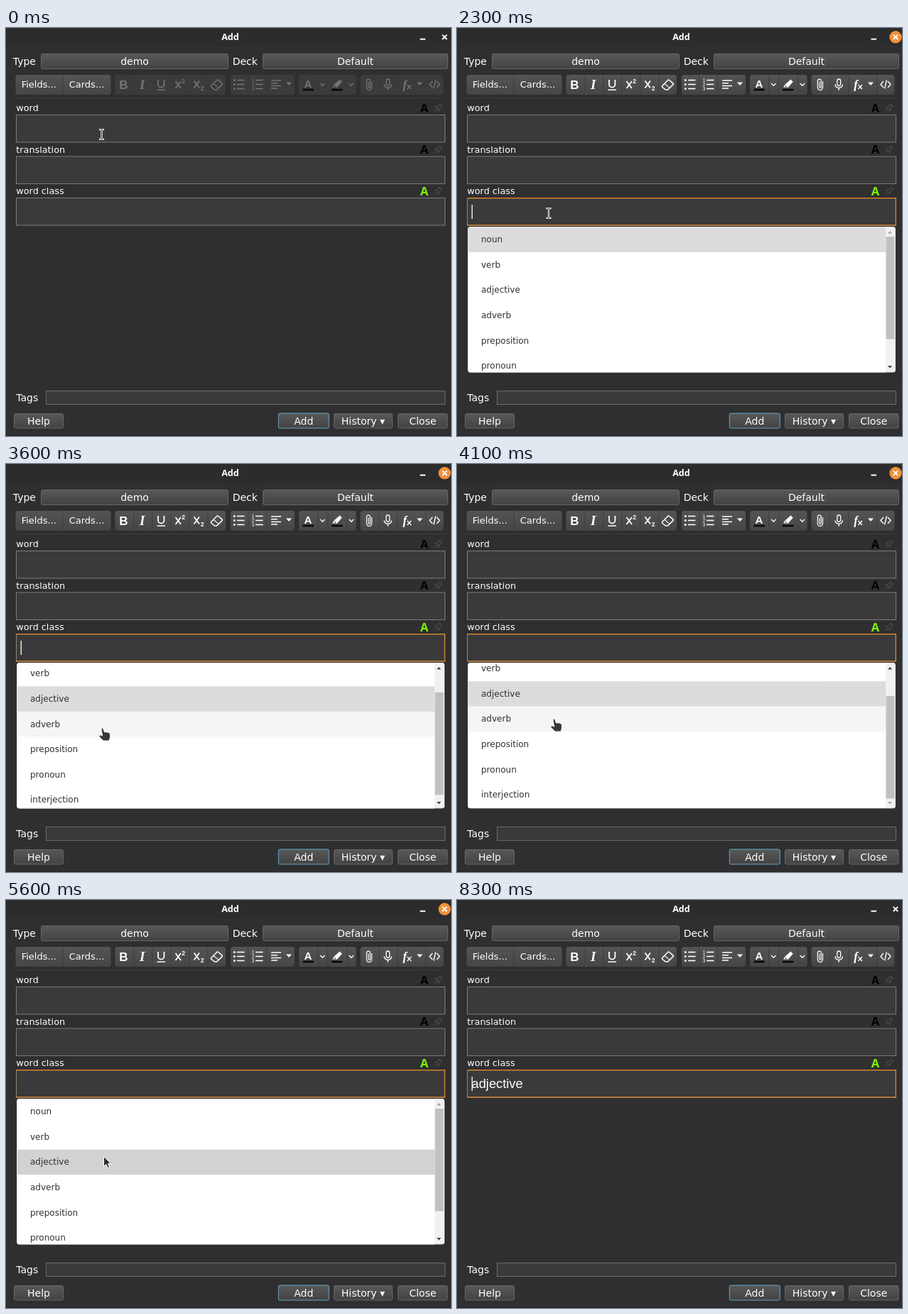
Write an HTML page that moves like this. It is 626x575 px and loops after 8400 ms.

```html
<!DOCTYPE html>
<html lang="en">
<head>
<meta charset="utf-8">
<title>Add</title>
<style>
html, body { margin: 0; width: 100%; height: 100%; overflow: hidden; background: #2f2f31; }
svg { display: block; width: 626px; height: 575px; }
text { font-family: "DejaVu Sans", sans-serif; white-space: pre; }
</style>
</head>
<body>
<svg id="stage" viewBox="0 0 626 575" xmlns="http://www.w3.org/2000/svg"></svg>
<script>
const LOOP = 8400, ROW = 35.6, TOP = 280.5, MAX_SCROLL = 45.5;
const WORDS = ["noun", "verb", "adjective", "adverb", "preposition", "pronoun", "interjection"];
const FIELDS = [["word", 122.5], ["translation", 181], ["word class", 239.5]];
const stage = document.getElementById("stage");

const rect = (x, y, w, h, fill, extra = "") =>
  `<rect x="${x}" y="${y}" width="${w}" height="${h}" fill="${fill}" ${extra}/>`;
const text = (x, y, s, size, fill = "#fff", extra = "") =>
  `<text x="${x}" y="${y}" font-size="${size}" fill="${fill}" ${extra}>${s}</text>`;
const path = (d, extra = "") => `<path d="${d}" ${extra}/>`;
const line = (d, w = 1.5, extra = "") =>
  path(d, `fill="none" stroke="currentColor" stroke-width="${w}" ${extra}`);
const MID = 'text-anchor="middle"';

const button = (x, y, w, h, label, border = "#666") =>
  rect(x, y, w, h, "url(#btn)", `rx="2" stroke="${border}"`) +
  text(x + w / 2, y + 15.5, label, 14, "#fff", MID);

function field([label, y], i) {
  const mark = i === 2 ? "#7cf800" : "#000";
  return text(14.3, y - 5.4, label, 12.8) +
    text(588.5, y - 3.6, "A", 16.5, mark, `${MID} font-weight="bold" style="font-family:'Noto Sans',sans-serif"`) +
    `<g transform="translate(607.5 ${y - 9.5}) rotate(45)" color="#4b4b4d">` +
    line("M-3-6H3M-2-6V-1L-4 1.5H4L2-1V-6M0 1.5V7", 1.2) + "</g>" +
    rect(14.5, y, 603, 38.5, "#3a3a3a", 'stroke="#7c7c7c"');
}

// Toolbar: button groups with their inner dividers
const GROUPS = [
  [153.5, 309, [179.5, 205.5, 231.5, 257.5, 283.5]],
  [316, 406, [340.5, 366.5]],
  [412, 492.5, [438.5, 452.5, 479.5]],
  [498.5, 615.5, [524.5, 550.5, 590.5]]
];
const group = ([a, b, cuts], fill) =>
  rect(a, 66, b - a, 28, fill, 'rx="4"') +
  cuts.map(x => rect(x, 66, 0.7, 28, "#39393a")).join("");
const groups = fill => GROUPS.map(g => group(g, fill)).join("");

const glyph = (x, y, s, size, extra) => text(x, y, s, size, "currentColor", `${MID} ${extra}`);
const SANS = `style="font-family:'Liberation Sans',sans-serif"`;
const SERIF = `style="font-family:'Liberation Serif',serif"`;
const caretDown = x => path(`M${x - 4} 76.5h8l-4 4.5z`, 'fill="currentColor"');
const chevron = x => line(`M${x - 3.2} 78l3.2 3.2 3.2-3.2`, 1.4);

function icons() {
  let s = glyph(165.5, 85.5, "B", 17, `font-weight="bold" ${SANS}`) +
    glyph(191.8, 85.5, "I", 19, `font-style="italic" font-weight="bold" ${SERIF}`) +
    line("M214 73v6.5a4.2 4.2 0 0 0 8.4 0V73", 1.8) + line("M212.5 87.2h11.5", 1.5) +
    line("M238.5 75l7.5 10M246 75l-7.5 10", 1.8) + glyph(249.5, 78, "2", 8.5, `font-weight="bold" ${SANS}`) +
    line("M264.5 74.5l7.5 10M272 74.5l-7.5 10", 1.8) + glyph(276, 88, "2", 8.5, `font-weight="bold" ${SANS}`) +
    line("M288.8 81.5l7.8-8q1-1 2 0l5.2 4.4q1 1 0 2l-7.2 7.2h-3.2l-4.6-3.8q-.9-.9 0-1.8z", 1.5) +
    line("M292 78.5l7.2 6.2", 1.1);
  for (const [i, y] of [73.5, 79.5, 85.5].entries()) {
    s += `<circle cx="321.3" cy="${y}" r="1.5" fill="currentColor"/>` + line(`M325 ${y}h10.5`, 1.6) +
      glyph(347.5, y + 2.3, i + 1, 6.3, SANS) + line(`M351 ${y}h10.5`, 1.6);
  }
  s += line("M373 74h14M373 77.7h9M373 81.4h14M373 85.1h9", 1.5) + caretDown(398) +
    glyph(424.8, 83.5, "A", 15, `font-weight="bold" ${SANS}`) + chevron(445.3) +
    path("M461.5 79.5l8-7 3.2 3.2-7 8h-3zl-2.5 4h4l1-1z", 'fill="currentColor"') + chevron(485.8) +
    rect(417.5, 85.8, 15.5, 2.6, "#080808") + rect(458, 85.8, 15.5, 2.6, "#080808") +
    line("M514.5 75v9a3.6 3.6 0 0 1-7.2 0v-9.3a2.5 2.5 0 0 1 5 0v8.8a1.2 1.2 0 0 1-2.4 0v-8", 1.2) +
    rect(534.8, 72, 4.8, 9.5, "none", 'rx="2.4" stroke="currentColor" stroke-width="1.3"') +
    line("M532 79.5a5.2 5 0 0 0 10.4 0M537.2 84.5v3.2", 1.4) +
    glyph(561, 84.5, "f", 17, `font-style="italic" font-weight="bold" ${SERIF}`) +
    line("M564.5 80l5.5 6M570 80l-5.5 6", 1.4) + caretDown(582) +
    line("M600 75l-4 4.5 4 4.5M606 75l4 4.5-4 4.5M604.4 73.5l-2.8 12", 1.4);
  return s;
}

const CURSORS = {
  beam: `<path d="M-3.5-8H-1L0-7.3 1-8H3.5V-5.8H1.2V5.8H3.5V8H1L0 7.3-1 8H-3.5V5.8H-1.2V-5.8H-3.5Z" fill="#fff"/>
    <path d="M-2.4-6.9H-.8L0-6.1.8-6.9H2.4M0-6V6M-2.4 6.9H-.8L0 6.1.8 6.9H2.4" fill="none" stroke="#333" stroke-width=".8"/>`,
  arrow: path("M0 0V14L3.3 11 5.6 16 8.1 14.9 5.9 10H10Z",
    'fill="#2d2d2d" stroke="#fff" stroke-width="1" stroke-linejoin="round"'),
  hand: path("M-2 1.2Q-.8-.6.8 1L2.6 6.2 4 5.5 5.5 6.3 7 5.7 8.3 6.8Q10-.2 10.3 8.5L10.5 13 9 18H1L-4.8 12.2Q-5.8 9.8-3.2 10L-.2 11.2Z"
    .replace("Q10-.2 10.3 8.5", "Q10 6.4 10.3 8.5"),
    'fill="#383838" stroke="#fff" stroke-width=".8" stroke-linejoin="round"')
};

stage.innerHTML = `<defs>
    <linearGradient id="btn" x2="0" y2="1"><stop stop-color="#585858"/><stop offset="1" stop-color="#434343"/></linearGradient>
    <linearGradient id="tool" x2="0" y2="1"><stop stop-color="#545454"/><stop offset="1" stop-color="#464646"/></linearGradient>
    <clipPath id="clip"><rect x="15" y="280" width="602" height="205.5" rx="4"/></clipPath>
  </defs>` +
  rect(0, 0, 626, 575, "#2f2f31") + rect(0, 0, 626, 26, "#2c2c2d") + rect(0, 574, 626, 1, "#232324") +
  text(315.5, 17, "Add", 12.6, "#fff", `${MID} font-weight="bold" style="font-family:'Noto Sans',sans-serif"`) +
  rect(582.5, 14.7, 7.5, 2, "#fff") +
  `<circle id="close" cx="617" cy="12.8" r="8.7" fill="#f0913a"/>` +
  `<g color="#fff">${line("M613.8 9.6l6.4 6.4M620.2 9.6l-6.4 6.4", 1.9)}</g>` +
  text(9.8, 52, "Type", 14) + button(49.5, 36.5, 263, 21, "demo") +
  text(318.7, 52, "Deck", 14) + button(361.5, 36.5, 260, 21, "Default") +
  rect(13.5, 66, 134, 28, "url(#tool)", 'rx="4"') + rect(79.5, 66, 0.7, 28, "#39393a") +
  text(46.3, 84, "Fields...", 13, "#fff", MID) + text(113.5, 84, "Cards...", 13, "#fff", MID) +
  groups("#3b3b3c") + `<g id="lit">${groups("url(#tool)")}</g><g id="icons">${icons()}</g>` +
  rect(10, 98, 606, 1, "#3b3b3d") +
  FIELDS.map(field).join("") +
  `<g id="focus1" fill="none">${path("M617.5 181H14.5V219.5H617.5", 'stroke="#9b9994" stroke-width="1.4"')}
    ${path("M617.3 181V219.5", 'stroke="#d08430" stroke-width="1.4"')}</g>
  <g id="focus2" fill="none">${path("M14.5 239.5V278", 'stroke="#958775"')}
    ${path("M14.5 239.8H617.3V278H14.5", 'stroke="#cf842f" stroke-width="1.4"')}</g>` +
  text(20.5, 265.2, "adjective", 18.3, "#fff", `id="value" ${SANS}`) +
  rect(20.6, 190.5, 1.3, 20, "#fff", 'id="caret"') +
  text(14.3, 525.5, "Tags", 14) + rect(56.5, 511.5, 561, 19, "#3a3a3a", 'stroke="#6b6b6b"') +
  button(11.5, 543.5, 69, 20.5, "Help") + button(383.3, 543, 71, 21, "Add", "#62a8c8") +
  button(461.5, 543.5, 82, 20.5, "History ▾") + button(551.5, 543.5, 69.5, 20.5, "Close") +
  `<g id="popup" clip-path="url(#clip)">${rect(15, 280, 602, 205.5, "#fff")}
    <g id="list">${WORDS.map((w, i) =>
      rect(16, TOP + i * ROW, 587, ROW, "#fff", `class="row" ${i === 2 ? 'rx="1"' : ""}`) +
      text(34, TOP + i * ROW + 21.6, w, 12, "#303030")).join("")}</g>
    ${rect(603, 280, 13, 205, "#f1f1f1") + rect(603.5, 294, 12, 144.5, "#c1c1c1", 'id="thumb"')}
    ${path("M606 289.5h6l-3-3.4z", 'id="up"') + path("M606 476h6l-3 3.4z", 'id="down"')}
    ${rect(15.5, 280, 601, 205, "none", 'rx="4" stroke="#d5d5d5" stroke-width=".8"')}
  </g><g id="cursor"></g>`;

const $ = id => document.getElementById(id);
const rows = [...document.querySelectorAll(".row")];
const show = (id, on) => $(id).setAttribute("display", on ? "inline" : "none");
const set = (id, name, value) => $(id).setAttribute(name, value);

// Pointer hotspot: time, x, y
const POINTER = [
  [100, 134.5, 150], [400, 121.5, 198], [1200, 121.5, 198], [1500, 129, 261],
  [2700, 129, 261], [3100, 133, 325], [3300, 135, 356], [3600, 136, 372],
  [4100, 137, 359], [4500, 138, 398], [4900, 132.5, 357.5], [5000, 132.5, 357.5],
  [5100, 137.5, 361.5], [5800, 137.5, 361.5], [6200, 141, 251], [6300, 141, 251],
  [6400, 142, 250], [7000, 142, 250], [7900, 131, -24]
];
const SCROLL = [[3300, 0], [3700, MAX_SCROLL], [4100, MAX_SCROLL], [4500, 0]];

function track(keys, t, col = 1) {
  const n = keys.findIndex(k => k[0] > t);
  if (n < 0) return keys[keys.length - 1][col];
  if (n === 0) return keys[0][col];
  const a = keys[n - 1], b = keys[n], p = (t - a[0]) / (b[0] - a[0]);
  return a[col] + (b[col] - a[col]) * p * p * (3 - 2 * p);
}

function activeRow(t) {
  if (t < 3200) return 0;
  if (t < 3300) return 1;
  return t >= 4200 && t < 4700 ? 3 : 2;
}

let shape = "";
function draw(ms) {
  const t = Math.floor(ms / 100) * 100;
  const open = t >= 2300 && t < 5700, enabled = t >= 700;
  const x = track(POINTER, t), y = track(POINTER, t, 2), scroll = track(SCROLL, t);

  show("close", enabled && t < 8200);
  show("lit", enabled);
  set("lit", "opacity", t === 700 ? 0.6 : 1);
  set("icons", "color", t < 700 ? "#747474" : t === 700 ? "#c0c0c0" : "#fff");

  show("focus1", enabled && t < 2300);
  show("focus2", t >= 2300);
  show("value", t >= 5700);
  const since = t - (t < 2300 ? 700 : 2300);
  show("caret", enabled && Math.floor(since / 600) % 2 === 0);
  set("caret", "y", t < 2300 ? 190.5 : 249);

  show("popup", open);
  if (open) {
    const active = activeRow(t);
    const hover = t >= 3200 ? Math.floor((y + scroll - TOP) / ROW) : -1;
    rows.forEach((r, i) => r.setAttribute("fill",
      i === active ? (t >= 5600 ? "#d2d2d2" : "#dcdcdc") : i === hover ? "#f5f5f5" : "#fff"));
    set("list", "transform", `translate(0 ${-scroll})`);
    set("thumb", "y", 294 + 33 * scroll / MAX_SCROLL);
    set("up", "fill", scroll > 0 ? "#404040" : "#a3a3a3");
    set("down", "fill", scroll < MAX_SCROLL ? "#404040" : "#a3a3a3");
  }

  const inField = FIELDS.some(f => y >= f[1] && y <= f[1] + 38.5);
  const kind = inField ? "beam" : open && y > 280 && t < 5600 ? "hand" : "arrow";
  if (kind !== shape) $("cursor").innerHTML = CURSORS[shape = kind];
  set("cursor", "transform", `translate(${x} ${y})`);
}

const start = performance.now();
function tick() {
  draw((performance.now() - start) % LOOP);
  requestAnimationFrame(tick);
}
tick();
</script>
</body>
</html>
```
